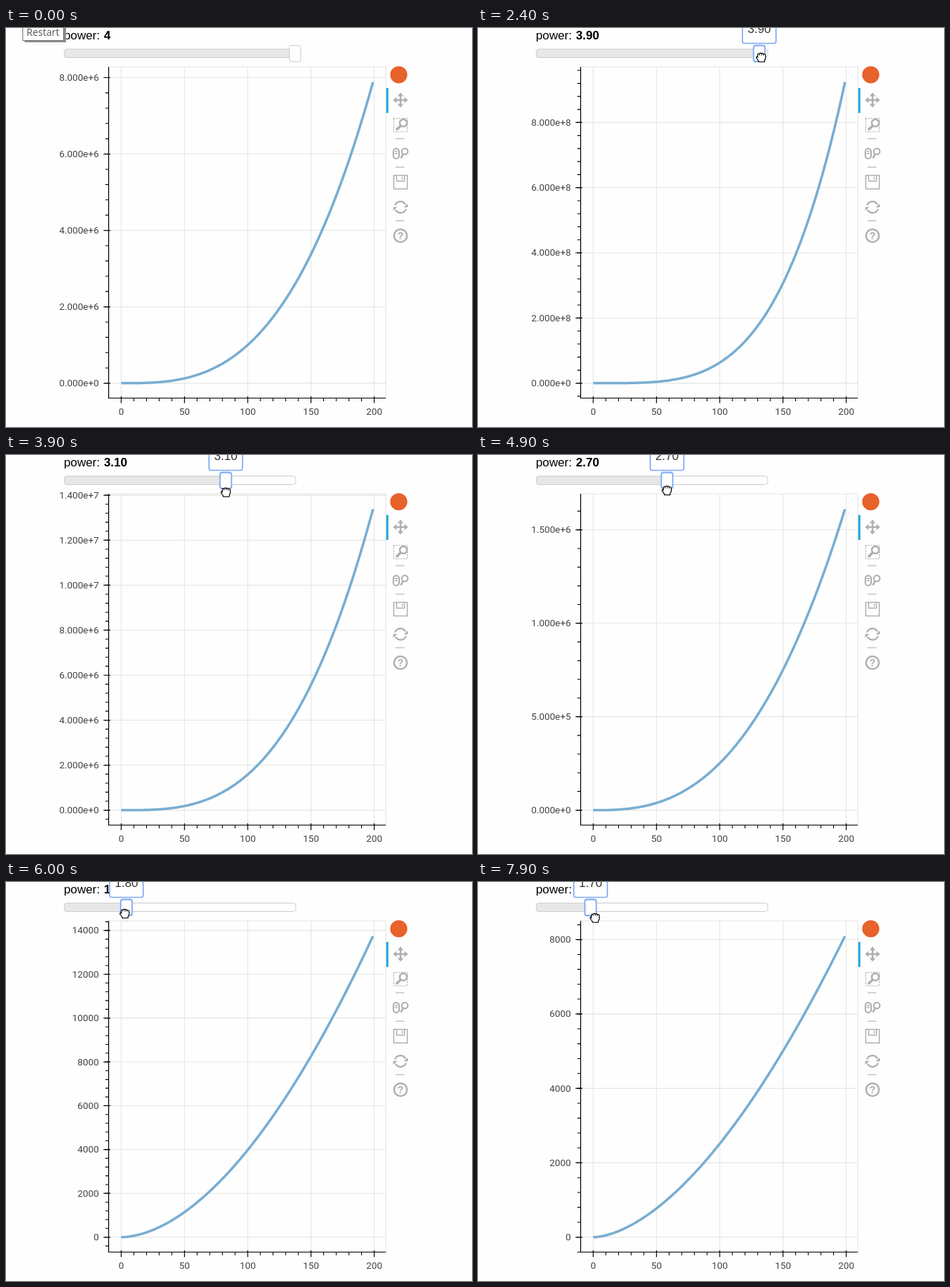
Write an HTML page that moves like this. It is 652 by 559 pixels and loops after 8 s.

```html
<!DOCTYPE html>
<html lang="en">
<head>
<meta charset="utf-8">
<title>Power slider</title>
<style>
  html, body { margin: 0; width: 100%; height: 100%; overflow: hidden; background: #fefefe; }
  svg { display: block; }
  text { font-family: "Liberation Sans", Arial, sans-serif; }
  .tick { font: 13.33px Roboto, sans-serif; fill: #444; }
  .label { font-size: 16.8px; fill: #000; }
  .hint { font: 13.8px "Open Sans", sans-serif; fill: #575757; }
</style>
</head>
<body>
<svg id="stage" width="652" height="559" viewBox="0 0 652 559">
  <g id="plot"></g>
  <g id="tools" fill="none" stroke="#afafaf"></g>
  <g id="slider"></g>
  <g id="pointer"></g>
</svg>
<script>
const LOOP = 8000, STEP = 100;
const BOX = { left: 143.6, right: 531.5, top: 54.5, bottom: 518.5 };
const X0 = 161.2, XS = 1.77, Y0 = 497.6, RISE = 421.7, LAST = 199;

// time, pointer x, pointer y, slider value
const KEYS = [
  [100, 548, 373, 4], [500, 500, 230, 4], [800, 414, 58, 4], [900, 409, 36.5, 4],
  [1000, 409, 36.5, 4], [1200, 409, 39, 4], [1300, 409, 39, 4], [1400, 408.5, 40, 4],
  [2000, 408, 40, 4], [2800, 384, 42, 3.8], [2900, 384, 42, 3.8], [3200, 374, 44.5, 3.7],
  [3900, 307.5, 52, 3.1], [4300, 277, 50, 2.8], [4800, 277, 50, 2.8], [5500, 187, 45, 2.1],
  [5600, 183, 45, 2], [5700, 183, 45, 2], [6000, 166, 44, 1.8], [6200, 166, 44, 1.8],
  [6700, 103, 39, 1.2], [6800, 98, 39, 1.1], [7100, 94, 40, 1.1], [7400, 94, 40, 1.1],
  [7900, 163.5, 50, 1.7]
];

const el = id => document.getElementById(id);
const path = (d, stroke, width, extra = "") =>
  `<path d="${d}" fill="none" stroke="${stroke}" stroke-width="${width}" ${extra}/>`;
const rect = (x, y, w, h, r, fill, stroke, width = 1) =>
  `<rect x="${x}" y="${y}" width="${w}" height="${h}" rx="${r}" fill="${fill}" stroke="${stroke}" stroke-width="${width}"/>`;
const text = (x, y, s, cls, extra = "") => `<text x="${x}" y="${y}" class="${cls}" ${extra}>${s}</text>`;

function stateAt(t) {
  if (t <= KEYS[0][0]) return KEYS[0].slice(1);
  const i = KEYS.findIndex(k => k[0] >= t);
  if (i < 0) return KEYS[KEYS.length - 1].slice(1);
  const a = KEYS[i - 1], b = KEYS[i], f = (t - a[0]) / (b[0] - a[0]);
  return [1, 2, 3].map(n => a[n] + (b[n] - a[n]) * f);
}

// the 1-2-5 step whose tick count comes closest to six
function tickStep(range) {
  const mag = 10 ** Math.floor(Math.log10(range / 6));
  const miss = s => Math.abs(6 - range / s);
  return [1, 2, 5, 10].map(m => m * mag).reduce((a, b) => miss(b) < miss(a) ? b : a);
}

function ticks(lo, hi, step) {
  const list = [];
  for (let n = Math.ceil(lo / step); n * step <= hi; n++) list.push(n * step);
  return list;
}

function drawPlot(power) {
  const max = LAST ** power, lo = -0.05 * max, hi = 1.05 * max;
  const step = tickStep(hi - lo);
  const px = v => X0 + v * XS, py = v => Y0 - v / max * RISE;
  const major = ticks(lo, hi, step), minor = ticks(lo, hi, step / 5);
  const sci = major[major.length - 1] >= 1e5;
  const { left, right, top, bottom } = BOX;
  let grid = "", marks = "", small = "", labels = "";

  for (const v of major) {
    const y = py(v);
    grid += `M${left} ${y}H${right}`;
    marks += `M136.5 ${y}H146`;
    labels += text(130, Math.round(y + 4.5), sci ? v.toExponential(3) : Math.round(v), "tick", 'text-anchor="end"');
  }
  for (const v of minor) small += `M139 ${py(v)}H${left}`;
  for (let v = 0; v <= 200; v += 10) {
    const x = px(v);
    if (v % 50) { small += `M${x} ${bottom}V523`; continue; }
    grid += `M${x} ${top}V${bottom}`;
    marks += `M${x} 516V525.5`;
    labels += text(x, 542, v, "tick", 'text-anchor="middle"');
  }
  let curve = "";
  for (let v = 0; v <= LAST; v++)
    curve += (v ? "L" : "M") + px(v).toFixed(2) + " " + py(v ** power).toFixed(2);

  el("plot").innerHTML =
    path(grid, "#e5e5e5", 1.1) +
    path(`M${left} ${top}H${right}V${bottom}`, "#e5e5e5", 1.1) +
    path(curve, "#79add2", 3.5, 'stroke-linejoin="round"') +
    path(`M${left} ${top}V${bottom}H${right}`, "#000", 1.2) +
    path(marks, "#000", 1.2) + path(small, "#000", 1.1) + labels;
}

function drawSlider(value, moved, hover, held) {
  const x = Math.floor(82 + (value - 1) * 107.5) + 0.5;
  const shown = moved ? value.toFixed(2) : "4";
  const edge = held ? "#7ba8f2" : "#ccc", line = held ? 1.8 : 1;
  let s = text(81, 16, "power:", "label") + text(137, 16, shown, "label", 'font-weight="bold"');
  s += rect(81.5, 29.5, 324, 12, 4, "#fff", "#ccc");
  s += rect(81.5, 29.5, x - 82, 12, 4, "#e7e7e7", "#d0d0d0");
  s += rect(x - 8, 24.5, 16, 22.5, 3, hover && !held ? "#f3f3f3" : "#fff", edge, line);
  if (hover) {
    const w = moved ? 47 : 23;
    s += rect(x - w / 2, -12, w, 33.5, 3, "#fff", edge, held ? 1.6 : 1);
    s += text(x, 7, shown, "label", 'text-anchor="middle" style="fill:#333"');
  }
  el("slider").innerHTML = s;
}

const ARROW = "M0 0V16L3.8 12.4L6.4 18.2L8.8 17.2L6.3 11.5H11.5Z";
const OPEN = "M-4 8.5V6.5L-8 1.5Q-9 -.5 -7.2 -1Q-6 -1 -4.5 1L-6.3 -4.5Q-6.4 -6.5 -5 -6.5Q-4 -6.4 -2.4 -1.5" +
  "L-2.7 -7Q-2.2 -8.6 -1 -8.4Q0 -8 .2 -2L1.2 -7.2Q2 -8.6 3.2 -7.8Q4 -7 3.2 -1.5L5.2 -4.8Q6.2 -6 7.4 -5Q8 -4 6.8 -1L5.5 5L4.5 8.5Z";
const FIST = "M-3.5 6.5V5L-6.3 1.5Q-7.2 -1 -4.8 -1.4V-3.5Q-4.5 -5.6 -2.4 -4.8Q-1.2 -6.8 .6 -5.2" +
  "Q2.2 -6.4 3.4 -4.4Q6 -5 6.3 -2.6V1.5L4.7 5V6.5Z";
const KNUCKLES = "M-4.8 -1.4V1M-2.4 -4.8V-2.6M.6 -5.2V-2.6M3.4 -4.4V-2.4";

function drawPointer(x, y, t) {
  let s = "";
  if (t < 100) {
    s = rect(26, -8, 58, 28, 0, "#8c8c8c", "none") + rect(23.5, -8, 57, 25.5, 0, "#fff", "#767676") +
      text(28.7, 11, "Restart", "hint");
  } else {
    const d = t < 900 ? ARROW : t < 1700 ? OPEN : FIST;
    s = `<g transform="translate(${x} ${y})"><path d="${d}" fill="#fff" stroke="#000" stroke-width="1.2" stroke-linejoin="round"/>` +
      (d === FIST ? path(KNUCKLES, "#000", 1) : "") + "</g>";
  }
  el("pointer").innerHTML = s;
}

function drawTools() {
  const g = "#afafaf";
  let s = '<circle cx="549.5" cy="65.5" r="12" fill="#e8622c" stroke="none"/>';
  s += '<path d="M532 84h3v35h-3z" fill="#26aae1" stroke="none"/>';
  s += path("M552 94V108M545 101H559", g, 2.4);
  for (let a = 0; a < 360; a += 90)
    s += `<path d="M552 90.5l4.2 5h-8.4z" fill="${g}" stroke="none" transform="rotate(${a} 552 101)"/>`;
  s += path("M542.5 126.5H561.5V145.5H542.5Z", g, 1.2, 'stroke-dasharray="2 1.5"');
  s += '<circle cx="556" cy="133" r="5" fill="#fefefe" stroke-width="2.5"/>' + path("M552.3 136.7L546 143", g, 3.4);
  s += rect(542, 169, 8, 14, 4, "none", g, 2) + path("M544 173H548M544 176H548", g, 1.3);
  s += '<circle cx="558" cy="173" r="4.2" stroke-width="2.1"/>' + path("M555.5 176.5L552.5 182.5", g, 2.5);
  s += rect(542.5, 206.5, 19, 19, 0, "none", g, 1.5) + path("M546.5 207V214.5H557.5V207M554.5 208.5V212.5", g, 1.4);
  for (const a of [0, 180])
    s += `<g transform="rotate(${a} 552 251)">` + path("M544.3 248.5A8 8 0 0 1 559 247.5", g, 2.2) +
      `<path d="M562.3 246V251.3H556.5Z" fill="${g}" stroke="none"/></g>`;
  s += '<circle cx="552" cy="291" r="9" stroke-width="2.4"/>';
  s += `<text x="552" y="296.2" font-size="14.5" font-weight="bold" text-anchor="middle" fill="${g}" stroke="none">?</text>`;
  s += path("M545 155H557.5M545 195H557.5M545 270H557.5", "#d2d2d2", 2);
  el("tools").innerHTML = s;
}

function render(t) {
  const [x, y, raw] = stateAt(t);
  const value = Math.round(raw * 10) / 10, moved = value < 4;
  drawPlot(moved ? value : 3);
  drawSlider(value, moved, t >= 900, t >= 1700);
  drawPointer(x, y, t);
}

let shownStep = -1;
function frame() {
  const step = Math.floor(performance.now() % LOOP / STEP);
  if (step !== shownStep) render((shownStep = step) * STEP);
  requestAnimationFrame(frame);
}

drawTools();
frame();
</script>
</body>
</html>
```
